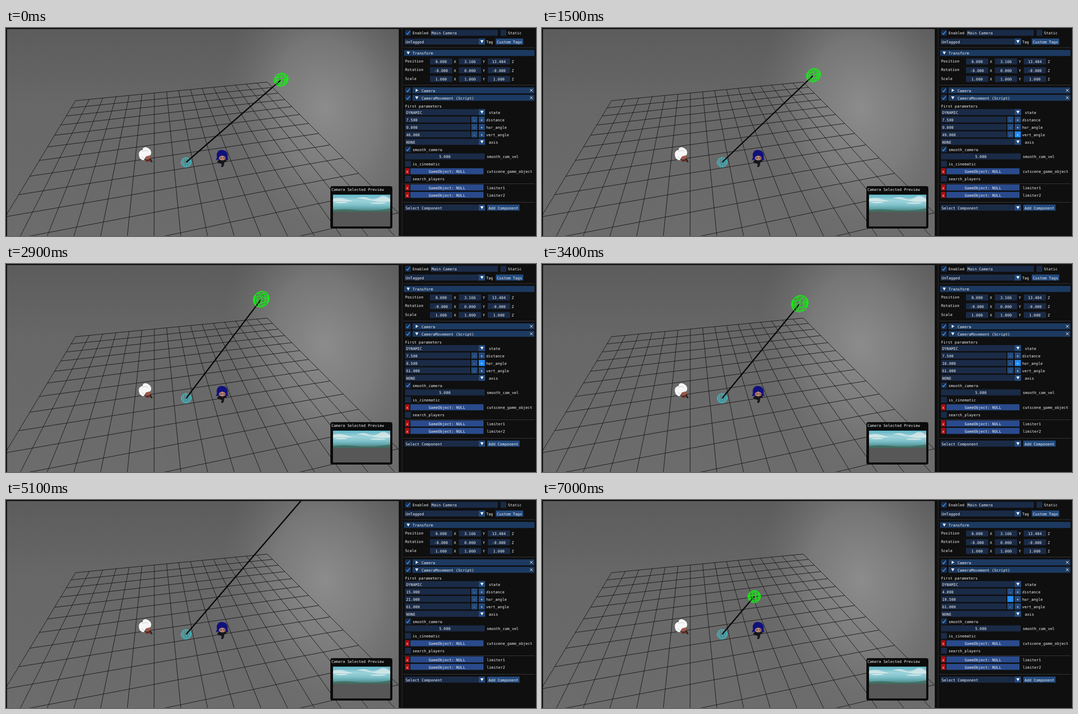
These frames come from a looping animation (1000 px wide and 392 px high, 7.1 s). An HTML page:

```html
<!DOCTYPE html>
<html lang="en">
<head>
<meta charset="utf-8">
<title>Camera movement inspector</title>
<style>
  html, body { margin: 0; width: 100%; height: 100%; overflow: hidden; background: #0f0f0f; }
  svg { display: block; width: 100vw; height: 100vh; }
  text { font: 7.16px "DejaVu Sans Mono", "Liberation Mono", monospace; fill: #f2f2f2; white-space: pre; }
  .field { fill: #1a2b47; }
  .btn { fill: #234a7d; }
  .head { fill: #1c3a61; }
  .wide { fill: #294a8c; }
  .red { fill: #a80f0f; }
  .hot { fill: #1f8cff; }
  .wire { fill: none; stroke-width: 1; }
</style>
</head>
<body>
<svg id="stage" viewBox="0 0 1000 392" preserveAspectRatio="none">
  <defs>
    <linearGradient id="floor" x1="0" y1="0" x2="0" y2="1">
      <stop offset="0" stop-color="#5c5c5c"/>
      <stop offset=".35" stop-color="#676767"/>
      <stop offset="1" stop-color="#6c6c6c"/>
    </linearGradient>
    <radialGradient id="glow" gradientUnits="userSpaceOnUse" cx="0" cy="0" r="1"
      gradientTransform="translate(602 150) rotate(-10) scale(190 260)">
      <stop offset="0" stop-color="#a0a0a0" stop-opacity=".65"/>
      <stop offset=".5" stop-color="#909090" stop-opacity=".48"/>
      <stop offset="1" stop-color="#777" stop-opacity="0"/>
    </radialGradient>
    <linearGradient id="sky" x1="0" y1="0" x2="0" y2="1">
      <stop offset="0" stop-color="#5fb4c6"/>
      <stop offset=".35" stop-color="#9dd2da"/>
      <stop offset=".6" stop-color="#7fc2cb"/>
      <stop offset=".82" stop-color="#5a9da0"/>
      <stop offset="1" stop-color="#486e66"/>
    </linearGradient>
    <clipPath id="view"><rect x="2" y="2" width="739" height="390"/></clipPath>
    <clipPath id="pic"><rect x="617" y="314" width="108" height="33"/></clipPath>
  </defs>

  <rect width="1000" height="392" fill="#0f0f0f"/>
  <g clip-path="url(#view)">
    <rect width="742" height="392" fill="url(#floor)"/>
    <rect width="742" height="392" fill="url(#glow)"/>
    <path id="grid" fill="none" stroke="#1e1e1e" stroke-width="1"/>

    <g id="pale">
      <path d="M264 244l9 2 4 7-3 0-4-5-5 2z" fill="#33201e"/>
      <ellipse cx="267" cy="243" rx="6" ry="5" fill="#9a5a48"/>
      <path d="M262 249l7-1 3 3-7 1z" fill="#6d2622"/>
      <path d="M251 241C249 234 254 230 258 230C257 225 264 223 269 227C275 230 275 237 272 240L264 242L260 249C255 249 252 246 251 241Z" fill="#f6f6f6"/>
      <path d="M258 233q5-4 10 0M257 242q3 3 4 5" fill="none" stroke="#c9c9c9"/>
    </g>
    <g id="dark">
      <path d="M402 248h13l2 3-5 2-1 6-2 3h-3l1-6-5-1-4-3z" fill="#17151c"/>
      <ellipse cx="408" cy="245" rx="6" ry="4.5" fill="#b58171"/>
      <path d="M398 244C396 234 402 229 408 230C415 230 420 236 418 244L420 249L414 248L414 243L408 240L402 243L402 248L396 249Z" fill="#11117c"/>
      <path d="M404 245h3m3 0h3" stroke="#1a1018"/>
    </g>

    <path id="aim" class="wire" stroke="#43b4bb" style="stroke-width:.8"/>
    <path id="cam" class="wire" stroke="#12f012"/>
    <line id="ray" stroke="#080808" stroke-width="2.4"/>
    <path id="camFront" class="wire" stroke="#12f012"/>
  </g>

  <rect x="612" y="298" width="117" height="80" rx="4" fill="#0b0b0b"/>
  <rect x="617" y="314" width="108" height="33" fill="url(#sky)"/>
  <g clip-path="url(#pic)" fill="#e8f0ee" opacity=".7">
    <path d="M617 322q14 -4 26 1t22 -3q-12 8 -24 7t-24 0z"/>
    <path d="M662 321q12 -5 22 0t20 -2t21 4v4q-16 2 -30 -1t-33 -5z"/>
    <ellipse cx="632" cy="329" rx="12" ry="1.5"/>
    <ellipse cx="702" cy="330" rx="15" ry="1.5"/>
  </g>
  <path d="M617 343q20 -3 46 0t62 -3v7h-108z" fill="#3f6658" opacity=".7"/>
  <rect x="617" y="347" width="108" height="27" fill="#575757"/>
  <g id="panel"></g>
</svg>

<script>
const NS = "http://www.w3.org/2000/svg";
const $ = id => document.getElementById(id);
const panel = $("panel");

function add(tag, attrs, text) {
  const el = document.createElementNS(NS, tag);
  for (const k in attrs) el.setAttribute(k, attrs[k]);
  if (text !== undefined) el.textContent = text;
  return panel.appendChild(el);
}
// Every helper takes the vertical centre of its row.
const label = (x, y, s, anchor = "start") => add("text", { x, y: y + 3, "text-anchor": anchor }, s);
const box = (x1, x2, y, cls, h = 11.4) =>
  add("rect", { x: x1, y: y - h / 2, width: x2 - x1, height: h, class: cls });
const rule = y => add("rect", { x: 750, y, width: 248, height: 1, fill: "#35353d" });

function check(x, y, on) {
  box(x, x + 11, y, "field");
  if (on) add("path", { d: `M${x + 2.3} ${y + .3}l2.4 2.6 4.2-6`, fill: "none", stroke: "#4296fa", "stroke-width": 1.5 });
}
function arrow(x, y, right) {
  add("path", { d: right ? `M${x - 2} ${y - 3}l5 3-5 3z` : `M${x - 3} ${y - 2.5}h6l-3 5.5z`, fill: "#fff" });
}
function button(x1, x2, y, s, cls = "btn") {
  const el = box(x1, x2, y, cls);
  label((x1 + x2) / 2, y, s, "middle");
  return el;
}
function combo(x1, y, s) {
  box(x1, 892, y, "field");
  box(892, 904, y, "btn");
  arrow(898, y);
  label(x1 + 2, y, s);
}
function stepper(y, name) {
  box(753, 876, y, "field");
  const text = label(755, y, "");
  const minus = button(878, 889.5, y, "-");
  const plus = button(892, 903.5, y, "+");
  label(906, y, name);
  return (value, dir) => {
    text.textContent = value.toFixed(3);
    minus.setAttribute("class", dir < 0 ? "hot" : "btn");
    plus.setAttribute("class", dir > 0 ? "hot" : "btn");
  };
}
function slot(y, name) {
  button(753, 761.5, y, "x", "red");
  button(763, 901, y, "GameObject: NULL", "wide");
  label(907, y, name);
}
function component(y, name, closed) {
  check(753, y, true);
  box(767, 997, y, "head");
  arrow(775, y, closed);
  label(784, y, name);
  add("path", { d: `M988.8 ${y - 2.4}l4.8 4.8m0-4.8l-4.8 4.8`, stroke: "#fff" });
}

add("rect", { x: 742, y: 0, width: 258, height: 392, fill: "#0f0f0f" });
add("rect", { x: 747, y: 0, width: 1, height: 392, fill: "#2c2c33" });
label(614, 304, "Camera Selected Preview");

check(753, 9, true);
label(767, 9, "Enabled");
box(801, 928, 9, "field");
label(803, 9, "Main Camera");
check(933, 9, false);
label(947, 9, "Static");
combo(752, 25.5, "UnTagged");
label(906, 25.5, "Tag");
button(924, 976, 25.5, "Custom Tags");
rule(36.5);
box(751, 997, 47, "head");
arrow(759, 47);
label(767, 47, "Transform");
[["Position", 63, "0.000", "3.166", "13.404"],
 ["Rotation", 79.5, "-0.000", "0.000", "-0.000"],
 ["Scale", 96, "1.000", "1.000", "1.000"]].forEach(([name, y, ...vals]) => {
  label(753, y - 1.5, name);
  vals.forEach((v, i) => {
    const x = 800 + 54.5 * i;
    box(x, x + 42, y, "field");
    label(x + 21, y, v, "middle");
    label(x + 45, y, "XYZ"[i]);
  });
});
rule(107);
component(117.5, "Camera", true);
component(131.5, "CameraMovement (Script)", false);
label(753, 146.5, "First parameters");
combo(753, 158.5, "DYNAMIC");
label(911, 158.5, "state");
const showDist = stepper(172.5, "distance");
const showHor = stepper(186.5, "hor_angle");
const showVert = stepper(200.5, "vert_angle");
combo(753, 214.5, "NONE");
label(911, 214.5, "axis");
check(753, 228.5, true);
label(767, 228.5, "smooth_camera");
box(753, 903, 242, "field");
label(828, 242, "5.000", "middle");
label(907, 242, "smooth_cam_vel");
check(753, 256, false);
label(767, 256, "is_cinematic");
slot(270, "cutscene_game_object");
check(753, 284, false);
label(767, 284, "search_players");
rule(293);
slot(300.5, "limiter1");
slot(314.5, "limiter2");
rule(328);
combo(752, 338.5, "Select Component");
button(908, 969, 338.5, "Add Component");

// Editor view: pinhole camera pitched down and turned slightly.
const RAD = Math.PI / 180, FOCAL = 340, CX = 371, CY = 196;
const sp = Math.sin(42 * RAD), cp = Math.cos(42 * RAD);
const sy = Math.sin(11.2 * RAD), cy = Math.cos(11.2 * RAD);
const AX = [sy, cy * sp, -cy * cp];
const AY = [0, -cp, -sp];
const AZ = [cy, -sy * sp, sy * cp];
const move = (p, x, y, z) => p.map((v, i) => v + AX[i] * x + AY[i] * y + AZ[i] * z);
const project = p => [CX + FOCAL * p[0] / p[2], CY + FOCAL * p[1] / p[2]];
const unproject = (x, y, depth) => [(x - CX) * depth / FOCAL, (y - CY) * depth / FOCAL, depth];
const path = pts => "M" + pts.map(p => project(p).map(v => v.toFixed(1)).join(" ")).join("L");

const target = unproject(340, 253, 12.06);
const corner = unproject(131, 137, 17.72);
const CELLS = 16, SIZE = 20.3;
let lines = "";
for (let i = 0; i <= CELLS; i++) {
  const s = i * SIZE / CELLS;
  lines += path([move(corner, s, 0, 0), move(corner, s, 0, SIZE)]);
  lines += path([move(corner, 0, 0, s), move(corner, SIZE, 0, s)]);
}
$("grid").setAttribute("d", lines);

function ring(c, point) {
  const pts = [];
  for (let i = 0; i <= 20; i++) pts.push(move(c, ...point(i * Math.PI / 10)));
  return path(pts);
}
function meridians(c, r, n) {
  let d = "";
  for (let i = 0; i < n; i++) {
    const a = Math.PI * i / n;
    d += ring(c, t => [r * Math.cos(t) * Math.cos(a), r * Math.cos(t) * Math.sin(a), r * Math.sin(t)]);
  }
  return d;
}
function parallels(c, r, n) {
  let d = "";
  for (let i = 1; i < n; i++) {
    const b = Math.PI * i / n, q = r * Math.sin(b);
    d += ring(c, t => [q * Math.cos(t), q * Math.sin(t), r * Math.cos(b)]);
  }
  return d;
}
const R = .33;
$("aim").setAttribute("d", meridians(target, R, 6) + parallels(target, R, 6));

// Held buttons: [start s, end s, units per second]
const holds = {
  vert: [[1.4, 1.9, 30]],
  hor: [[2.3333, 3.7333, 15], [6.9, 7.1, -15]],
  dist: [[4.1, 4.6, 15], [5.1333, 5.8667, -15]]
};
function track(name, start, step, t) {
  let value = start, dir = 0;
  for (const [a, b, rate] of holds[name]) {
    value += rate * Math.max(0, Math.min(t, b) - a);
    if (t >= a && t < b) dir = Math.sign(rate);
  }
  return [Math.round(value / step) * step, dir];
}

function draw(t) {
  const dist = track("dist", 7.5, .5, t);
  const hor = track("hor", 0, .5, t);
  const vert = track("vert", 46, 1, t);
  showDist(...dist);
  showHor(...hor);
  showVert(...vert);

  const h = hor[0] * RAD, v = vert[0] * RAD, flat = dist[0] * Math.cos(v);
  const pos = move(target, flat * Math.sin(h), dist[0] * Math.sin(v), flat * Math.cos(h));
  $("cam").setAttribute("d", meridians(pos, R, 6));
  $("camFront").setAttribute("d", parallels(pos, R, 6));
  const [x, y] = project(pos), ray = $("ray");
  ray.setAttribute("x1", 340);
  ray.setAttribute("y1", 253);
  ray.setAttribute("x2", x);
  ray.setAttribute("y2", y);
}

const LOOP = 7100, TICK = 100;
let began = null;
function frame(now) {
  if (began === null) began = now;
  const ms = (now - began) % LOOP;
  draw(Math.floor(ms / TICK) * TICK / 1000);
  requestAnimationFrame(frame);
}
draw(0);
requestAnimationFrame(frame);
</script>
</body>
</html>
```
